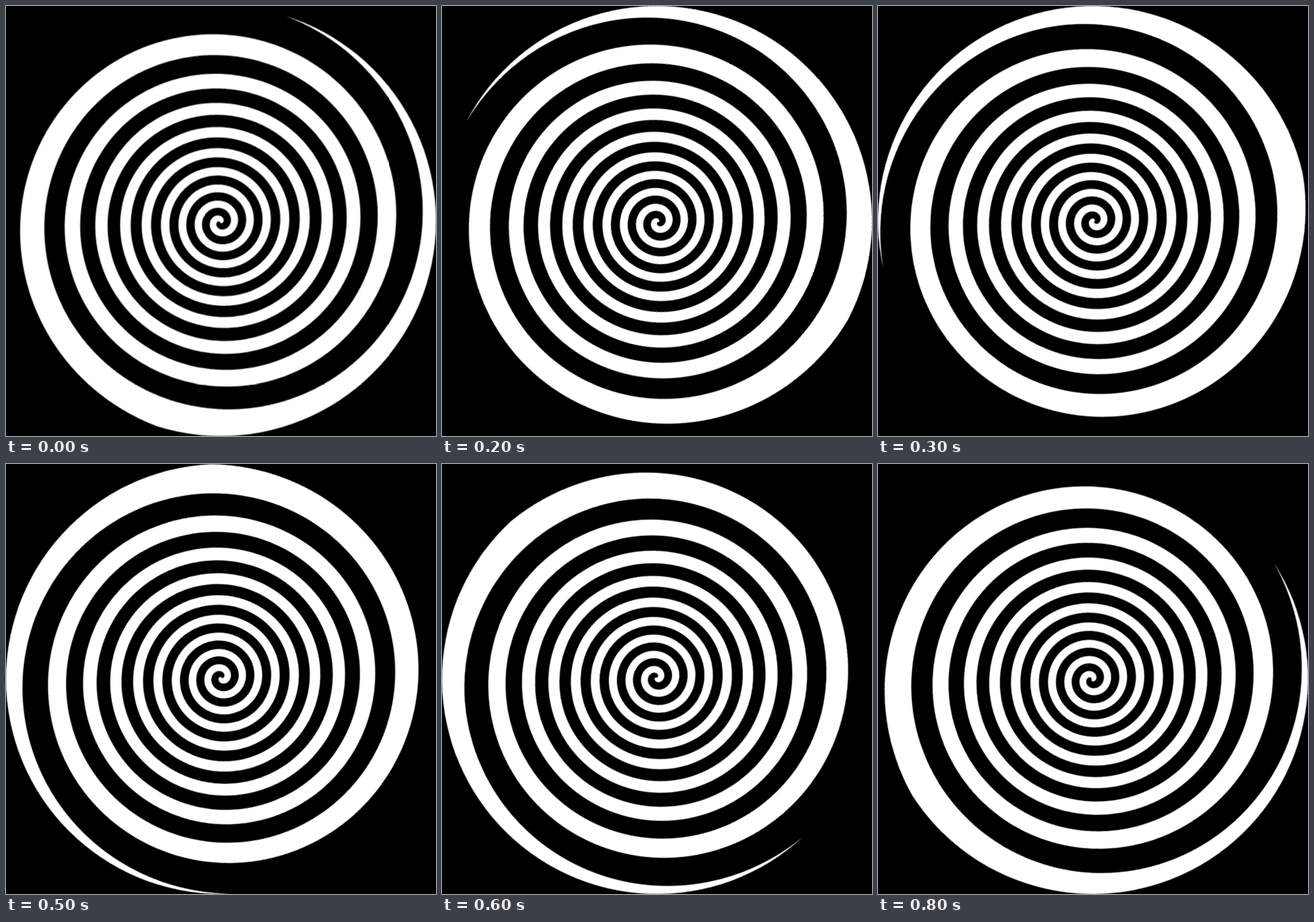
Recreate the animation shown at these times as an HTML page. Size 593x593 px, loop 0.9 s.

```html
<!DOCTYPE html>
<html lang="en">
<head>
<meta charset="utf-8">
<title>Spiral</title>
<style>
  html, body { margin: 0; width: 100%; height: 100%; overflow: hidden; background: #000; }
  svg { display: block; width: 100%; height: 100%; }
  #spiral {
    fill: #fff;
    transform-origin: 0 0;
    animation: spin 900ms steps(9, end) -1ms infinite;
  }
  @keyframes spin { to { transform: rotate(-360deg); } }
</style>
</head>
<body>
<svg viewBox="-296.5 -296.5 593 593"><path id="spiral"/></svg>
<script>
  const RADIUS = 296.5;
  const START = -72.8 * Math.PI / 180; // direction of the tip at the rim
  const EYE = { x: -1.2, y: 1.9 };     // the innermost coil sits slightly off the axis
  const STEPS = 2400;

  // Clockwise twist in half turns, where u runs from 0 at the rim to 1 at the centre.
  const twist = u => 5.45 * u + 12.38 * u * u;
  const inset = u => 0.025 * Math.min(1, u * 10);

  function edgePoint(u, halfTurns) {
    const angle = START + halfTurns * Math.PI;
    const r = RADIUS * (1 - u);
    const x = r * Math.cos(angle) + EYE.x * u;
    const y = r * Math.sin(angle) + EYE.y * u;
    return `${x.toFixed(2)} ${y.toFixed(2)}`;
  }

  const inner = [];
  const outer = [];
  for (let i = 0; i <= STEPS; i++) {
    const u = i / STEPS;
    inner.push(edgePoint(u, twist(u) + inset(u)));
    outer.push(edgePoint(u, twist(u) + 1 - inset(u)));
  }

  document.getElementById('spiral').setAttribute('d',
    `M${inner.reverse().join('L')}A${RADIUS} ${RADIUS} 0 0 1 ${outer.join('L')}Z`);
</script>
</body>
</html>
```
